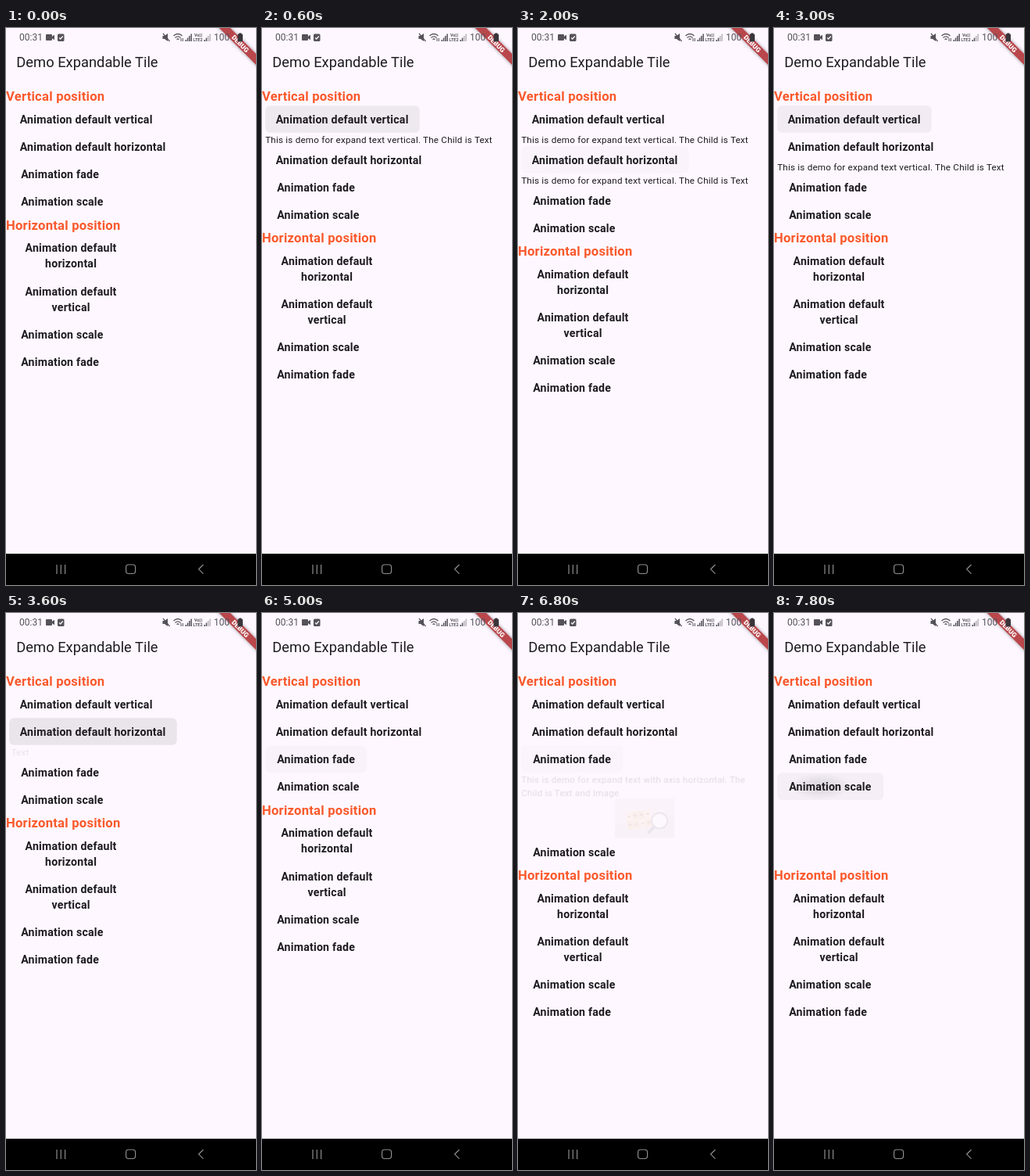
Write an HTML page that moves like this. It is 320 px wide and 712 px high and loops after 8 s.

```html
<!DOCTYPE html>
<html lang="en">
<head>
<meta charset="utf-8">
<title>Expandable tiles</title>
<style>
  html, body { margin: 0; width: 100%; height: 100%; overflow: hidden; background: #fef7ff; }
  svg { display: block; }
  text { font-family: Roboto, sans-serif; fill: #1d1b20; }
  .title { font-size: 18.33px; }
  .head { font-size: 16.67px; font-weight: 700; letter-spacing: .208px; fill: #fa592b; }
  .tile { font-size: 14.17px; font-weight: 700; letter-spacing: .208px; }
  .body { font-size: 11.667px; letter-spacing: .208px; }
  .status text { fill: #55525a; }
</style>
</head>
<body>
<svg id="stage" width="320" height="712" viewBox="0 0 320 712">
  <defs>
    <radialGradient id="ripple">
      <stop offset="0" stop-color="#1d1b20" stop-opacity=".12"/>
      <stop offset=".4" stop-color="#1d1b20" stop-opacity=".08"/>
      <stop offset="1" stop-color="#1d1b20" stop-opacity="0"/>
    </radialGradient>
    <filter id="soft" x="-20%" y="-60%" width="140%" height="220%"><feGaussianBlur stdDeviation="2"/></filter>
  </defs>
  <rect width="320" height="712" fill="#fef7ff"/>
  <text class="title" x="13.33" y="49.6">Demo Expandable Tile</text>
  <g id="list"></g>

  <g transform="translate(320 0) rotate(45)">
    <rect x="-40" y="23.3" width="80" height="10" fill="#000" opacity=".4" filter="url(#soft)"/>
    <rect x="-40" y="23.3" width="80" height="10" fill="#b9474c"/>
    <text y="31.4" text-anchor="middle" font-size="8.5" font-weight="800" style="fill:#fff">DEBUG</text>
  </g>

  <g class="status" fill="#55525a">
    <text x="17" y="16.2" font-size="12">00:31</text>
    <path d="M52 8h6a1 1 0 0 1 1 1v1.800l3-2v6.400l-3-2v1.800a1 1 0 0 1-1 1h-6a1 1 0 0 1-1-1v-6a1 1 0 0 1 1-1z"/>
    <rect x="66" y="7.500" width="8.500" height="9.500" rx="1.500"/>
    <path d="M68 12.300l1.700 1.700 3-3.500" fill="none" stroke="#fef7ff" stroke-width="1.200"/>
    <path d="M200.500 10h2.500l4-3v10l-4-3h-2.500z"/>
    <path d="M201 7l8.500 10" stroke="#55525a" stroke-width="1.200"/>
    <g fill="none" stroke="#55525a" stroke-width="1.300">
      <path d="M214.500 10q5.500-5 11 0M216.500 12.400q3.500-3 7 0M218.500 14.600q1.500-1.200 3 0"/>
      <path d="M224 13v4M226.300 13v4" stroke-width="1"/>
    </g>
    <g id="signals"></g>
    <text x="241" y="11" font-size="5.500" font-weight="700">Vo))</text>
    <text x="239.500" y="17" font-size="5.500" font-weight="700">LTE2</text>
    <text x="266" y="16.200" font-size="12">100</text>
    <rect x="296.500" y="7.500" width="6.500" height="10" rx="1.200" fill="#39343a"/>
    <rect x="298.300" y="6.500" width="3" height="2" fill="#39343a"/>
  </g>

  <rect y="672" width="320" height="40"/>
  <g fill="none" stroke="#8c8c8c" stroke-width="1.200">
    <path d="M65 686v12M70.300 686v12M75.600 686v12"/>
    <rect x="153.600" y="686" width="12" height="11.500" rx="3.200"/>
    <path d="M252.500 686l-5.800 5.800 5.800 5.800"/>
  </g>
</svg>
<script>
const LOOP = 8000, LEFT = 4.17, LINE = 16.67, TILE = 35.1, WRAP = 20.1, HEAD = 23.81;
const PANEL = 2 * LINE + 50, TEXT_WIDTH = 291.7;
const list = document.getElementById('list');

function add(parent, tag, attrs, text) {
  const node = document.createElementNS('http://www.w3.org/2000/svg', tag);
  for (const key in attrs) node.setAttribute(key, attrs[key]);
  if (text) node.textContent = text;
  parent.appendChild(node);
  return node;
}

const move = (node, y) => node.setAttribute('transform', `translate(0 ${y})`);

// Linear interpolation through [time, value] pairs, held at both ends
function track(keys, t) {
  if (t <= keys[0][0]) return keys[0][1];
  for (let i = 1; i < keys.length; i++) {
    const [t0, v0] = keys[i - 1], [t1, v1] = keys[i];
    if (t < t1) return v0 + (v1 - v0) * (t - t0) / (t1 - t0);
  }
  return keys[keys.length - 1][1];
}

function heading(label) {
  const node = add(list, 'g', {});
  add(node, 'text', { class: 'head', x: 0, y: 18.4 }, label);
  return { node, height: HEAD };
}

function tile(label, x, width, press) {
  const node = add(list, 'g', {});
  const glow = add(node, 'rect', { x: LEFT, y: .4, width, height: TILE - .6, rx: 6, fill: '#1d1b20', opacity: 0 });
  add(node, 'text', { class: 'tile', x, y: 23.3 }, label);
  return { node, glow, press, height: TILE };
}

function wrappedTile(...lines) {
  const node = add(list, 'g', {});
  lines.forEach((line, i) => add(node, 'text',
    { class: 'tile', x: 83.1, y: 23.3 + i * WRAP, 'text-anchor': 'middle' }, line));
  return { node, height: TILE + WRAP };
}

function panel(lines, full, open, shape) {
  const node = add(list, 'g', {});
  const clip = add(node, 'svg', { x: LEFT, y: 0, width: 316, height: full, overflow: 'hidden' });
  const content = add(clip, 'g', {});
  lines.forEach((line, i) => add(content, 'text', { class: 'body', x: 0, y: 13.2 + i * LINE }, line));
  return { node, clip, content, full, open, shape };
}

function picture(parent) {
  const g = add(parent, 'g', { transform: `translate(120 ${2 * LINE})` });
  add(g, 'rect', { width: 76, height: 50, fill: '#dcd8d3' });
  add(g, 'path', { d: 'M0 50V34L76 20V50z', fill: '#cbc6c2' });
  const blocks = add(g, 'g', { transform: 'rotate(-8 30 27)' });
  for (let i = 0; i < 8; i++) {
    add(blocks, 'rect', { x: 15 + i % 4 * 8, y: 16 + (i >> 2) * 11, width: 7.5, height: 10.5, rx: 1, fill: i % 3 ? '#e3b765' : '#efcf90' });
    add(blocks, 'path', { d: `M${17 + i % 4 * 8} ${21 + (i >> 2) * 11}h3.500`, stroke: '#79582f', 'stroke-width': 2 });
  }
  add(g, 'path', { d: 'M51 35L43 43', stroke: '#4b4849', 'stroke-width': 3, 'stroke-linecap': 'round' });
  add(g, 'circle', { cx: 57, cy: 28, r: 10, fill: '#f3f1f2', stroke: '#5d5a5c', 'stroke-width': 1.6 });
}

const note = 'This is demo for expand text vertical. The Child is Text';
const fadePanel = panel(['This is demo for expand text with axis horizontal. The', 'Child is Text and Image'], PANEL,
  [[5350, 0], [5850, 1], [6450, 1], [6850, 0]], 'fade');
picture(fadePanel.content);

const scaleTile = tile('Animation scale', 19.17, 136,
  [[7200, 0], [7500, .04]]);
const spot = add(scaleTile.node, 'ellipse', { cx: 60, cy: 17.5, rx: 38, ry: 17, fill: 'url(#ripple)' });

const rows = [
  heading('Vertical position'),
  tile('Animation default vertical', 17.7, 197.5,
    [[150, 0], [400, .07], [650, .07], [1050, 0], [2500, 0], [2700, .07], [2900, .07], [3250, 0]]),
  panel([note], LINE, [[230, 0], [560, 1], [2600, 1], [2950, 0]], 'vertical'),
  tile('Animation default horizontal', 17.7, 214.5,
    [[1350, 0], [1550, .07], [1700, .07], [2000, .015], [2150, 0], [3150, 0], [3350, .085], [3650, .085], [4000, 0]]),
  panel([note], LINE, [[1420, 0], [1790, 1], [3260, 1], [3635, 0]], 'horizontal'),
  tile('Animation fade', 19.17, 130,
    [[4750, 0], [4950, .018], [5350, .018], [5450, .07], [5650, .07], [6000, 0], [6300, 0], [6420, .07], [6560, .07], [6800, .012], [6900, 0]]),
  fadePanel,
  scaleTile,
  panel([], PANEL, [[7500, 0], [7501, .001]], 'fade'),
  heading('Horizontal position'),
  wrappedTile('Animation default', 'horizontal'),
  wrappedTile('Animation default', 'vertical'),
  tile('Animation scale', 19.17, 136),
  tile('Animation fade', 19.17, 130)
];

function updatePanel(row, t) {
  const open = track(row.open, t);
  const tall = row.shape === 'vertical' ? row.full * open : row.full;
  const shift = row.shape === 'horizontal' ? (open - 1) * TEXT_WIDTH : 0;
  row.height = open > 0 ? tall : 0;
  row.clip.setAttribute('height', row.height);
  row.clip.setAttribute('width', row.shape === 'horizontal' ? TEXT_WIDTH * open : 316);
  row.content.setAttribute('transform', `translate(${shift} ${tall - row.full})`);
  row.content.setAttribute('opacity', open);
}

function render(t) {
  let y = 75;
  for (const row of rows) {
    if (row.open) updatePanel(row, t);
    if (row.press) row.glow.setAttribute('opacity', track(row.press, t));
    move(row.node, y);
    y += row.height;
  }
  spot.setAttribute('opacity', track([[7300, 0], [7550, 1]], t));
}

const signals = document.getElementById('signals');
for (const [x, lit] of [[229.5, 4], [253.5, 2]])
  for (let i = 0; i < 4; i++)
    add(signals, 'rect', { x: x + i * 2.3, y: 15 - i * 2.5, width: 1.5, height: 2 + i * 2.5, opacity: i < lit ? 1 : .4 });

const start = performance.now();
function tick() {
  render((performance.now() - start) % LOOP);
  requestAnimationFrame(tick);
}
tick();
</script>
</body>
</html>
```
